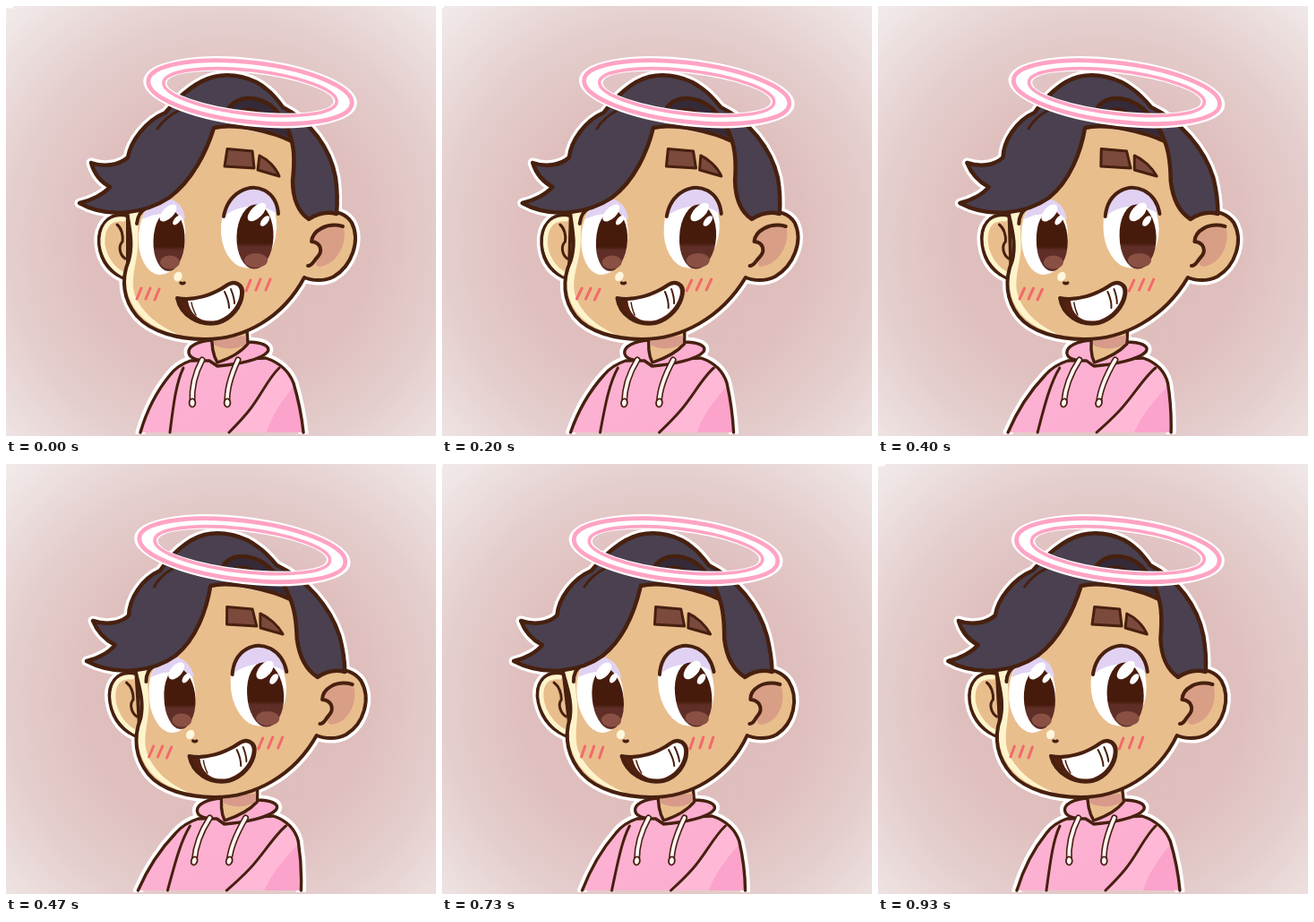
An HTML page for the animation above (0.99 s loop, 480 px wide and 480 px high).

```html
<!DOCTYPE html>
<html lang="en">
<head>
<meta charset="utf-8">
<title>Swaying portrait</title>
<style>
html, body { margin: 0; width: 100%; height: 100%; overflow: hidden; background: #e4cecd; }
svg { display: block; width: 100vw; height: 100vh; }
</style>
</head>
<body>
<svg viewBox="0 0 480 480" xmlns="http://www.w3.org/2000/svg">
  <defs>
    <radialGradient id="bg" gradientUnits="userSpaceOnUse" cx="248" cy="262" r="350">
      <stop offset="0" stop-color="#debbba"/>
      <stop offset=".45" stop-color="#dfbfbe"/>
      <stop offset=".7" stop-color="#e4cecd"/>
      <stop offset="1" stop-color="#f0e9e8"/>
    </radialGradient>
    <linearGradient id="iris" x2="0" y2="1">
      <stop offset=".6" stop-color="#471b0b"/>
      <stop offset=".66" stop-color="#5f2f27"/>
    </linearGradient>
    <linearGradient id="pink" x2="1" y2=".6">
      <stop offset="0" stop-color="#fdb4d3"/>
      <stop offset="1" stop-color="#fcacd0"/>
    </linearGradient>
    <clipPath id="floor"><rect width="480" height="478"/></clipPath>
  </defs>
  <rect width="480" height="480" fill="url(#bg)"/>
  <g id="figure" clip-path="url(#floor)" stroke-linecap="round" stroke-linejoin="round"></g>
</svg>
<script>
const LOOP = 990, STEP = 1000 / 15;
const INK = '#47200f', SKIN = '#e9be8d', GLOW = '#fdf4cc', HAIR = '#4a404f';
const PINK = 'url(#pink)', RING = '#ffa3c4', WHITE = '#fff', LILAC = '#e1d2f3', BROW = '#7c4a3d';
const figure = document.getElementById('figure');
const parts = [];

function add(d, fill = 'none', stroke = 'none', width = 0) {
  const el = document.createElementNS('http://www.w3.org/2000/svg', 'path');
  el.setAttribute('fill', fill);
  el.setAttribute('stroke', stroke);
  el.setAttribute('stroke-width', width);
  el.setAttribute('fill-rule', 'evenodd');
  figure.append(el);
  parts.push({ el, d });
}

const line = (d, width = 4, color = INK) => add(d, 'none', color, width);

// Rotated ellipse as eight quadratic arcs
function oval(cx, cy, rx, ry, deg = 0) {
  const r = deg * Math.PI / 180, n = 8, bulge = 1 / Math.cos(Math.PI / n);
  const at = (i, s = 1) => {
    const a = i * 2 * Math.PI / n, x = rx * s * Math.cos(a), y = ry * s * Math.sin(a);
    return (cx + x * Math.cos(r) - y * Math.sin(r)).toFixed(2) + ' ' +
           (cy + x * Math.sin(r) + y * Math.cos(r)).toFixed(2);
  };
  let d = 'M' + at(0);
  for (let i = 0; i < n; i++) d += 'Q' + at(i + .5, bulge) + ' ' + at(i + 1);
  return d + 'Z';
}

const torso = 'M150 476C157 452 169 429 183 412C189 404 197 399 206 396L290 393C305 398 316 408 321 421C326 438 330 457 332 476';
const hood = 'M230 373C214 374 203 380 204 387C205 394 216 396 227 396L236 402C258 400 285 395 292 386C296 379 284 375 269 375L268 368L230 368Z';
const neck = 'M230 364C229 380 231 390 236 398C248 394 262 387 270 377L269 362Z';
const earL = 'M136 234C114 230 102 246 104 266C106 286 118 300 136 305Z';
const earR = 'M330 246C340 228 374 222 386 242C396 262 386 290 366 302C354 308 342 307 330 302Z';
const cheek = 'M135 226C136 244 143 262 137 284C128 306 131 328 146 346C162 364 192 372 222 372C266 372 309 348 333 303';
const face = cheek + 'L342 236L326 150L226 130L170 200Z';
const hair = 'M82 220C95 217 109 210 116 202C105 196 98 186 95 175C109 180 126 178 136 169C139 151 156 128 178 119C192 102 212 84 232 79C252 74 276 80 291 93C299 99 304 106 309 113C339 128 362 158 368 192C370 207 370 221 369 232C358 229 347 232 338 238C326 230 320 214 320 195C322 177 322 162 319 151C300 141 256 130 232 136C224 162 208 195 182 214C158 230 116 239 82 220Z';

for (const d of [torso, hood, earL, earR, face, hair]) add(d, WHITE, WHITE, 11);

// Hoodie
const sleeve = 'M305 404C293 415 284 436 271 452C263 462 255 470 249 476';
add(torso + 'Z', PINK);
add(sleeve + 'L332 476C330 457 326 438 321 421C318 413 312 407 305 404Z', '#ffb9d7');
add('M322 424C308 440 296 458 291 476L332 476C330 457 326 438 322 424Z', '#fba3cb');
line(torso, 3.4);
line('M198 404C190 420 187 444 183 476', 3);
line(sleeve, 3);
add(hood, PINK, INK, 3.4);
add(neck, SKIN, INK, 3.4);
add('M232 371L232 378C243 384 258 384 268 377L268 368Z', '#d79a8b');
for (const d of ['M219 395C212 408 207 426 208 443', 'M259 395C253 408 246 426 247 443']) {
  line(d, 7);
  line(d, 3.8, '#fff6f4');
}
for (const x of [208, 247]) add(oval(x, 443, 3.4, 4.6), '#fff6f4', INK, 1.8);

// Ears
add(earL, SKIN, INK, 4);
line('M131 238C113 236 107 250 108 266C110 281 119 293 130 299', 5, GLOW);
line('M124 244C129 248 131 256 130 263C125 268 127 278 133 282', 3);
add(earR, SKIN, INK, 4);
add('M377 247C360 242 344 251 342 263C352 265 353 275 347 282C345 287 346 291 350 291C371 288 381 264 377 247Z', '#d99f86');
line('M376 246C358 241 342 251 341 263C352 264 354 274 347 281C343 285 342 290 337 290', 4);

// Face
add(face, SKIN);
add('M136 230C139 248 144 264 139 284C130 306 134 326 148 343C160 357 178 364 196 368C172 359 150 342 143 320C139 304 146 286 147 270C148 254 146 242 150 226Z', GLOW);
line(cheek);

// Eyes
add(oval(174, 257, 26, 43, 4), WHITE);
add('M152 238C157 220 172 212 185 216C195 220 199 228 200 238C186 230 168 230 152 238Z', LILAC);
add(oval(271, 247.5, 31, 45, 3), WHITE);
add('M244 234C248 208 272 198 288 207C297 213 301 222 302 232C288 221 264 220 244 234Z', LILAC);
add(oval(182, 262, 17.5, 34, 2), 'url(#iris)');
add(oval(183, 286, 11, 7.5), '#8a5044');
add(oval(278, 257.5, 20.5, 36, 2), 'url(#iris)');
add(oval(279, 284, 13, 8), '#8a5044');
for (const [x, y, rx, ry, a] of [[181, 231, 6, 12, 45], [191, 239, 3.2, 6.5, 40], [280, 230, 6.5, 13, 45], [289, 240, 3.5, 7, 40]])
  add(oval(x, y, rx, ry, a), WHITE);
line('M146 243C147 234 150 229 156 226');
line('M243 235C248 208 272 197 289 206C298 211 303 220 304 232');

// Nose, mouth, cheeks
add(oval(192, 302, 4.5, 5.5, 25), '#fff6dc');
line('M195 309C196 310 198 310 199 309', 3.5);
add('M191 326C210 330 232 322 246 312C256 305 265 311 264 321C263 335 252 350 236 354C215 358 195 345 191 326Z', '#54200f', INK, 4);
add('M203 329C220 328 235 322 247 314C255 308 262 313 261 321C260 333 250 347 235 351C218 354 206 346 203 329Z', WHITE);
line('M207 331C208 337 210 341 212 345', 1.5);
line('M244 319C247 325 249 331 249 337', 2);
line('M251 316C253 321 255 327 255 332', 2);
for (const [x, y] of [[151, 315], [161, 315], [171, 316], [273, 306], [284, 305], [295, 305]])
  line(`M${x} ${y}L${x - 5} ${y + 12}`, 3, '#f3696a');

// Hair and brow
add(hair, HAIR, INK, 4.5);
add('M245 130C246 110 262 100 280 104C298 108 313 128 318 147C296 138 266 132 245 130Z', '#352a38');
line('M244 126C246 109 262 100 280 104C299 108 314 128 319 151', 4.5);
line('M254 124C261 114 273 112 283 120', 3);
line('M194 116C184 121 175 128 169 137', 3);
add('M247 159.5L275 162L277 181L244 179Z', BROW, INK, 3);
add('M283 167C292 171 301 180 305 190L281 183Z', BROW, INK, 3);

// Halo
const ring = (a, b) => oval(272.5, 96.2, a, b, 6.5);
add(ring(120, 38) + ring(93.5, 21), WHITE);
line(ring(114.3, 33.2), 4.8, RING);
line(ring(97.2, 24.3), 3.6, RING);

add('M-20 0L8 0L8 2.5L-20 2.5Z', WHITE);

// Each row sways sideways as a wave runs down the figure
const sway = (y, k) => 7 * Math.cos(2 * Math.PI * (k - 1.7 - (y - 95) * .027) / 16);

function draw(k) {
  for (const { el, d } of parts)
    el.setAttribute('d', d.replace(/(-?[\d.]+) (-?[\d.]+)/g, (_, x, y) =>
      (+x + sway(+y, k) - sway(+y, 0)).toFixed(2) + ' ' + y));
}

let last = -1;
function tick(now) {
  const k = Math.floor((now % LOOP + 3.4) / STEP);
  if (k !== last) draw(last = k);
  requestAnimationFrame(tick);
}
draw(0);
requestAnimationFrame(tick);
</script>
</body>
</html>
```
